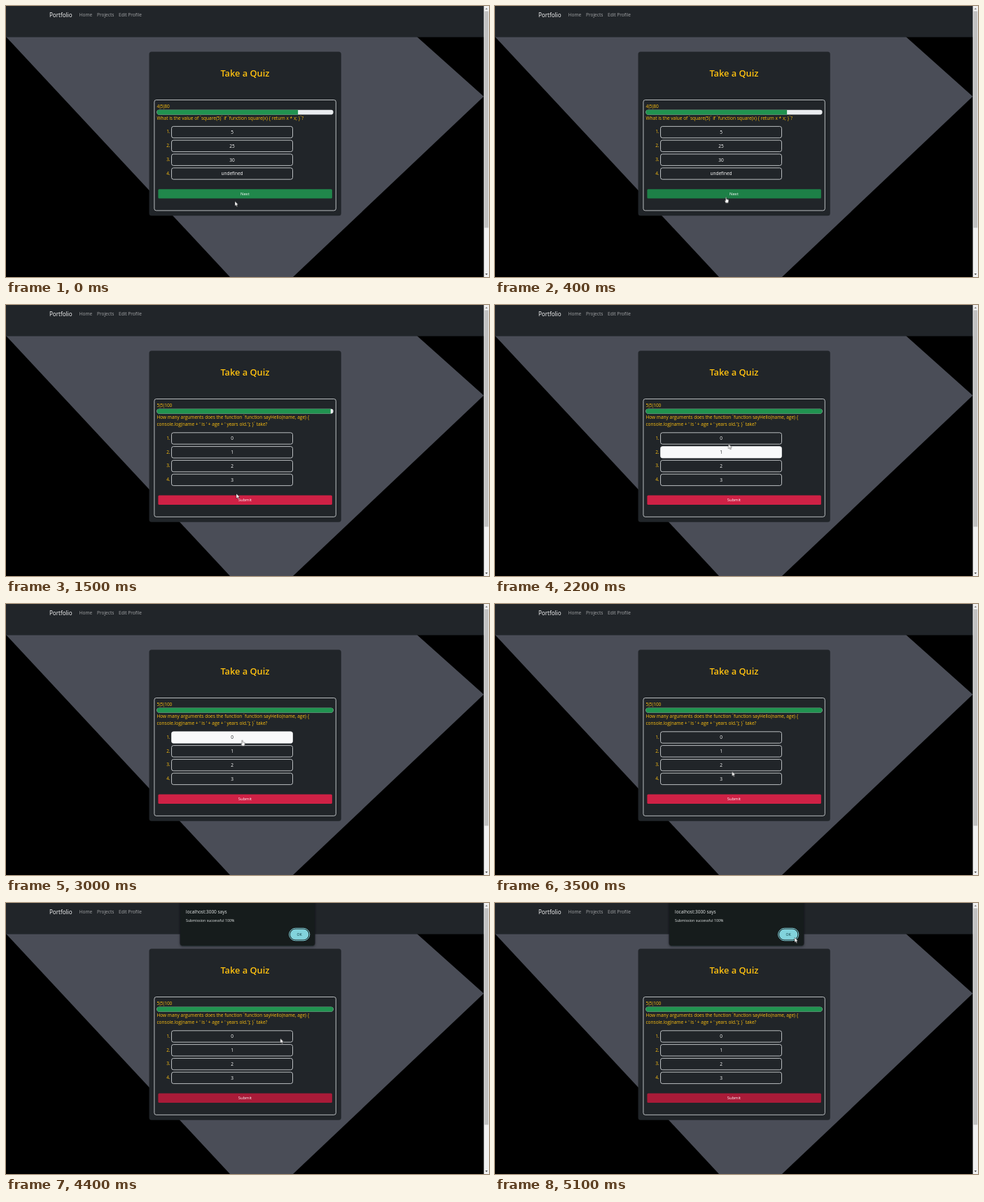
Animation of 690 by 388 pixels, one loop 5200 ms. Source, as an HTML page:

```html
<!DOCTYPE html>
<html lang="en">
<head>
<meta charset="utf-8">
<title>Quiz</title>
<style>
  html, body { margin: 0; width: 100%; height: 100%; overflow: hidden; background: #000; }
  svg { display: block; width: 100vw; height: 100vh; font: 6.52px "Open Sans", "Noto Sans", sans-serif; }
  text { white-space: pre; }
  .thin { font-family: Roboto, sans-serif; }
  .nav { fill: #a3a5a7; font-size: 6.55px; }
  .gold { fill: #fdc010; }
  .mid { text-anchor: middle; fill: #fff; }
  .btn { font-size: 5.8px; }
  .line { fill: none; stroke: #dfe2e5; stroke-width: .8; }

  .anim, .q1, .q2, .over, .submit, .hand, .arrow, .dialog { animation: 5.2s step-end infinite; }
  .q1 { animation-name: first; }
  .q2 { animation-name: second; }
  @keyframes first { 0% { opacity: 1 } 21.15%, 100% { opacity: 0 } }
  @keyframes second { 0% { opacity: 0 } 21.15%, 100% { opacity: 1 } }

  .next { fill: #20874b; animation: next 5.2s step-end infinite; }
  @keyframes next { 0% { fill: #20874b } 5.76%, 100% { fill: #1d8047 } }
  .submit { fill: #cf2145; animation-name: submit; }
  @keyframes submit { 0% { fill: #cf2145 } 73.07%, 100% { fill: #a91b38 } }

  .fill { width: 201.6px; animation: fill 5.2s linear infinite; }
  @keyframes fill {
    0% { width: 201.6px }
    21.15% { width: 201.6px; animation-timing-function: ease }
    32.69%, 100% { width: 252px }
  }

  .over { opacity: 0; }
  .over1 { animation-name: over1; }
  .over2 { animation-name: over2; }
  .over3 { animation-name: over3; }
  .over4 { animation-name: over4; }
  @keyframes over1 { 0%, 63.46%, 100% { opacity: 0 } 44.23% { opacity: 1 } }
  @keyframes over2 { 0%, 44.23%, 65.38%, 100% { opacity: 0 } 40.38%, 63.46% { opacity: 1 } }
  @keyframes over3 { 0%, 40.38%, 67.3%, 100% { opacity: 0 } 38.46%, 65.38% { opacity: 1 } }
  @keyframes over4 { 0%, 38.46%, 71.15%, 100% { opacity: 0 } 36.53%, 69.23% { opacity: 1 } }

  .dialog { animation-name: dialog; }
  @keyframes dialog { 0% { opacity: 0 } 80.76%, 100% { opacity: 1 } }

  .cursor { animation: move 5.2s linear infinite; }
  @keyframes move {
    0% { transform: translate(327px, 279.5px); animation-timing-function: steps(6) }
    11.53% { transform: translate(331.5px, 270.5px) }
    23.07% { transform: translate(331.5px, 270.5px); animation-timing-function: steps(3) }
    28.84% { transform: translate(329px, 270px); animation-timing-function: steps(2) }
    32.69% { transform: translate(329px, 264px) }
    34.61% { transform: translate(329px, 264px); animation-timing-function: steps(4) }
    42.3% { transform: translate(333.5px, 198.7px); animation-timing-function: steps(2) }
    46.15% { transform: translate(337.5px, 194.7px) }
    61.53% { transform: translate(337.5px, 194.7px); animation-timing-function: steps(6) }
    73.07% { transform: translate(339.5px, 284.5px) }
    80.76% { transform: translate(339.5px, 284.5px); animation-timing-function: steps(4) }
    88.46% { transform: translate(444px, 103px); animation-timing-function: steps(5) }
    98.07%, 100% { transform: translate(428px, 49.5px) }
  }
  .hand { animation-name: hand; }
  .arrow { animation-name: arrow; }
  @keyframes hand {
    0%, 21.15%, 42.3%, 67.3%, 71.15%, 82.69%, 100% { opacity: 0 }
    5.76%, 36.53%, 44.23%, 69.23%, 73.07% { opacity: 1 }
  }
  @keyframes arrow {
    0%, 21.15%, 42.3%, 67.3%, 71.15%, 82.69%, 100% { opacity: 1 }
    5.76%, 36.53%, 44.23%, 69.23%, 73.07% { opacity: 0 }
  }
</style>
</head>
<body>
<svg viewBox="0 0 690 388" preserveAspectRatio="none">
  <defs>
    <clipPath id="track"><rect x="215.5" y="148.8" width="252" height="6.6" rx="2.8"/></clipPath>
    <filter id="shade" x="-10%" y="-20%" width="120%" height="150%">
      <feDropShadow dx="0" dy="1" stdDeviation="1.5" flood-opacity=".5"/>
    </filter>
  </defs>

  <rect width="690" height="388"/>
  <path d="M0 44H587L682.5 129.5L410 388H320Z" fill="#4a4d57"/>
  <rect width="683" height="44.6" fill="#212529"/>
  <text x="62" y="15.6" font-size="8.1" fill="#fff">Portfolio</text>
  <g class="nav">
    <text x="104.6" y="15">Home</text>
    <text x="130" y="15">Projects</text>
    <text x="161" y="15">Edit Profile</text>
  </g>

  <g id="quiz"></g>

  <rect x="682.6" width="7.4" height="388" fill="#f1f1f1"/>
  <rect x="683.6" y="7.5" width="5.6" height="310" fill="#c1c1c1"/>
  <path d="M684.6 5L686.4 2.8L688.2 5Z" fill="#888"/>
  <path d="M684.6 383L686.4 385.2L688.2 383Z" fill="#505050"/>

  <g class="dialog">
    <rect x="248.5" y="-6" width="193" height="67.2" rx="4" fill="#171d1f" filter="url(#shade)"/>
    <text x="257" y="15.2" font-size="6.5" font-weight="500" fill="#e6eaea">localhost:3000 says</text>
    <text x="257" y="27.4" font-size="5.26" fill="#e6eaea">Submission successful 100%</text>
    <rect x="404.6" y="36.2" width="29.2" height="17.6" rx="8.8" fill="none" stroke="#82d3dc"/>
    <rect x="406" y="37.6" width="26.4" height="14.8" rx="7.4" fill="#82d3dc"/>
    <text x="419.2" y="46.9" font-size="5.2" text-anchor="middle" fill="#0c3a40">OK</text>
  </g>

  <g class="cursor">
    <path class="arrow" d="M0 0V7L1.6 5.6L2.7 8L3.8 7.5L2.8 5.1H4.9Z" fill="#fff" stroke="#000" stroke-width=".4"/>
    <path class="hand" d="M-.6 .6Q0 -.4 .7 .6V3L3.2 3.5Q4 3.8 3.9 5L3.3 8.4H-.4L-2 5.6Q-2 4.7 -.6 5.4Z" fill="#fff" stroke="#000" stroke-width=".4"/>
  </g>
</svg>
<script>
  const slim = s => s.replace(/[`|]/g, '<tspan class="thin">$&</tspan>');
  const text = (x, y, cls, s) => `<text x="${x}" y="${y}" class="${cls}">${slim(s)}</text>`;
  const box = (x, y, w, h, r, attrs) =>
    `<rect x="${x}" y="${y}" width="${w}" height="${h}" rx="${r}" ${attrs}/>`;

  function option(label, i, dy, hover) {
    const y = 180.6 + i * 19.8 + dy;
    const lit = hover
      ? `<g class="over over${i + 1}">${box(236.5, y - 8.2, 173, 16.4, 2.8, 'fill="#f8f9fa"')}
         <text x="323" y="${y + 2.4}" text-anchor="middle" fill="#212529">${label}</text></g>`
      : '';
    return `<text x="234.6" y="${y + 1.8}" text-anchor="end" class="gold">${i + 1}.</text>`
      + box(236.5, y - 8.2, 173, 16.4, 2.8, 'class="line"')
      + text(323, y + 2.4, 'mid', label) + lit;
  }

  function quiz({ cls, count, lines, options, button, action, hover }) {
    const dy = (lines.length - 1) * 10.4;
    return `<g class="${cls}">`
      + box(204.5, 65.5, 274.3, 234.8 + dy, 3.5, 'fill="#212529"')
      + '<text x="341.4" y="100.7" class="gold" font-size="12.8" font-weight="600" text-anchor="middle">Take a Quiz</text>'
      + box(211.9, 134.5, 259.4, 158.4 + dy, 2.8, 'class="line"')
      + text(215.5, 145.6, 'gold', count)
      + '<g clip-path="url(#track)"><rect x="215" y="148" width="253" height="8" fill="#e9ecef"/>'
      + '<rect class="fill" x="215.5" y="148" height="8" fill="#219350"/></g>'
      + lines.map((s, i) => text(215.5, 163 + i * 10.3, 'gold', s)).join('')
      + options.map((s, i) => option(s, i, dy, hover)).join('')
      + box(217.4, 262.2 + dy, 248.5, 13.4, 1.5, `class="${action}"`)
      + text(341.4, 271 + dy, 'mid btn', button) + '</g>';
  }

  document.getElementById('quiz').innerHTML = quiz({
    cls: 'q1', count: '4|5|80', button: 'Next', action: 'next',
    lines: ['What is the value of `square(5)` if `function square(x) { return x * x; }`?'],
    options: ['5', '25', '30', 'undefined']
  }) + quiz({
    cls: 'q2', count: '5|5|100', button: 'Submit', action: 'submit', hover: true,
    lines: [
      'How many arguments does the function `function sayHello(name, age) {',
      "console.log(name + ' is ' + age + ' years old.'); }` take?"
    ],
    options: ['0', '1', '2', '3']
  });
</script>
</body>
</html>
```
